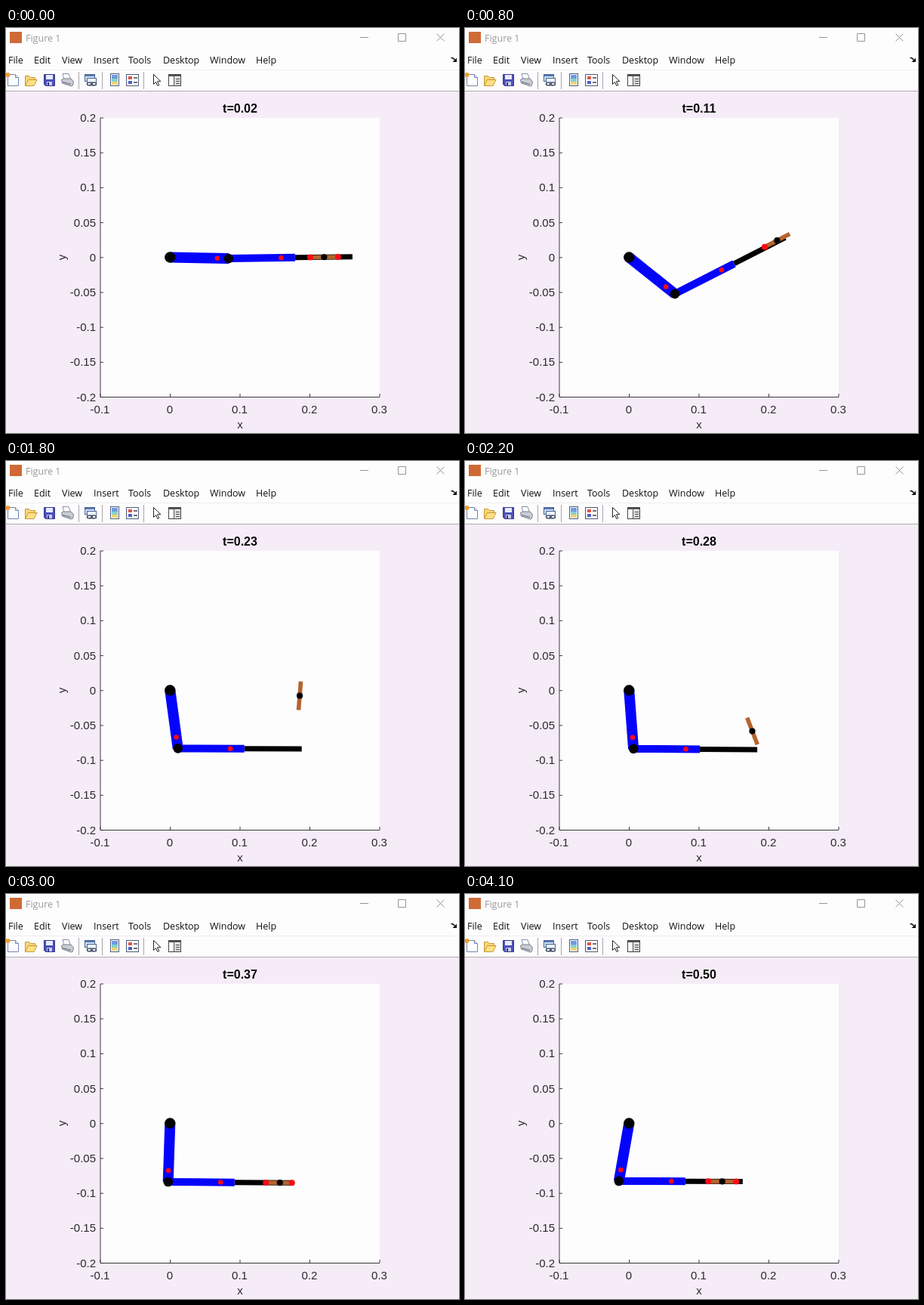
An HTML page that plays this animation: 600x536 px, repeating every 4.2 s.

```html
<!DOCTYPE html>
<html lang="en">
<head>
<meta charset="utf-8">
<title>Figure 1</title>
<style>
html, body { margin: 0; width: 100%; height: 100%; overflow: hidden; background: #f5ecf8; }
svg { display: block; width: 600px; height: 536px; }
.ui { font: 12.5px "Open Sans", sans-serif; fill: #111; }
.ax { font: 15px "Liberation Sans", sans-serif; fill: #2b2a2c; }
.head { font: bold 16px "Liberation Sans", sans-serif; fill: #0a0a0a; }
</style>
</head>
<body>
<svg viewBox="0 0 600 536" xmlns="http://www.w3.org/2000/svg">
  <rect width="600" height="536" fill="#f5ecf8"/>
  <rect width="600" height="83" fill="#fefdfe"/>
  <path d="M0 55.5H600" stroke="#f0ecf1"/>
  <path d="M0 83.5H600" stroke="#b0acb1"/>

  <!-- title bar -->
  <rect x="5" y="5" width="16" height="15" fill="#cf6a35"/>
  <text class="ui" x="26" y="17.5" style="fill:#999">Figure 1</text>
  <path d="M469 12.5H480M519.5 7.5h10v10h-10zM570.5 7.5l10 10m0-10l-10 10" fill="none" stroke="#959595"/>
  <path d="M589.5 39.5q3-.5 5 3" fill="none" stroke="#111" stroke-width="1.5"/>
  <path d="M597 39.5V45H591.5z" fill="#111"/>
  <g id="menu" class="ui"></g>

  <!-- toolbar -->
  <g stroke-width="1">
    <path d="M2.5 61.5h10l4 4v11h-14z" fill="#fdfdff" stroke="#7186ad"/>
    <path d="M12.5 61.5v4h4" fill="#d7e0f2" stroke="#7186ad"/>
    <circle cx="2.5" cy="62" r="3" fill="#ef9d32"/>
    <path d="M25.5 76V63.5h5l2 2h6v3" fill="#f7d675" stroke="#c49a3a"/>
    <path d="M25.5 76.5l4-8h11.5l-4 8z" fill="#ffe083" stroke="#c49a3a"/>
    <path d="M50.5 61.5h14v15h-12l-2-2z" fill="#4c50ba" stroke="#34388c"/>
    <rect x="53" y="62" width="9" height="6" fill="#e8ecfb"/>
    <rect x="54" y="71" width="7" height="5" fill="#c9cfe6"/>
    <rect x="55" y="72" width="2" height="4" fill="#34388c"/>
    <path d="M77 68l-2-7.5h8l2.5 7.5z" fill="#fff" stroke="#8891a5"/>
    <path d="M73.5 68.5l2.500-1.500h10l3.500 4-1 5-2 1-12-4z" fill="#c9ccd5" stroke="#787e8c"/>
    <path d="M75 71.5l11 3" stroke="#5f6572"/>
    <rect x="104.5" y="61.5" width="13" height="9" fill="#cfe0f5" stroke="#47648f"/>
    <path d="M105 63h12" stroke="#5679b5" stroke-width="2"/>
    <rect x="107.5" y="66.5" width="12" height="9" fill="#eef4fc" stroke="#47648f"/>
    <ellipse cx="111" cy="74" rx="3.5" ry="2" fill="none" stroke="#4b5568" stroke-width="1.5"/>
    <ellipse cx="116" cy="74" rx="3.5" ry="2" fill="none" stroke="#4b5568" stroke-width="1.5"/>
    <rect x="138.5" y="60.5" width="11" height="16" fill="#fff" stroke="#4d5c78"/>
    <rect x="140" y="62" width="8" height="5" fill="#6f9be0"/>
    <rect x="140" y="67" width="8" height="4" fill="#86d2cc"/>
    <rect x="140" y="71" width="8" height="4" fill="#f1d477"/>
    <rect x="159.5" y="61.5" width="16" height="15" fill="#fff" stroke="#4d5c78"/>
    <rect x="162" y="64" width="5" height="4" fill="#dd5548"/>
    <rect x="162" y="70" width="5" height="4" fill="#4d62c9"/>
    <path d="M169 66h5M169 72h5" stroke="#444" stroke-width="1.5"/>
    <path d="M195.5 61.5v13l3-3 2.300 5 2-1-2.300-4.800h4.500z" fill="#fff" stroke="#222"/>
    <rect x="215.5" y="61.5" width="16" height="15" fill="#fff" stroke="#444"/>
    <path d="M216 63h15" stroke="#555" stroke-width="2"/>
    <rect x="223" y="65" width="8" height="11" fill="#dcd9de"/>
    <path d="M222.5 64v12M225 67.5h5M225 70.5h5M225 73.5h5" stroke="#555"/>
    <path d="M96.5 58v23M127.5 58v23M182.5 58v23" stroke="#a9a5ab"/>
  </g>

  <!-- axes -->
  <rect x="125" y="119" width="370" height="370" fill="#fefdfe"/>
  <g id="axes" class="ax"></g>
  <text id="head" class="head" x="310" y="112" text-anchor="middle"></text>

  <g id="arm"></g>
</svg>
<script>
const $ = id => document.getElementById(id);

function add(parent, tag, attrs, text) {
  const el = document.createElementNS("http://www.w3.org/2000/svg", tag);
  set(el, attrs);
  if (text !== undefined) el.textContent = text;
  return parent.appendChild(el);
}
function set(el, attrs) {
  for (const k in attrs) el.setAttribute(k, attrs[k]);
}

const menu = { File: 3, Edit: 37, View: 74, Insert: 116, Tools: 162, Desktop: 208, Window: 270, Help: 331 };
for (const name in menu) add($("menu"), "text", { x: menu[name], y: 47 }, name);

let ticks = "M125 119V488.5H495";
for (let i = 0; i < 5; i++) {
  const x = 125 + 92.5 * i;
  ticks += `M${x} 488v-4`;
  add($("axes"), "text", { x: x - 0.5, y: 509.5, "text-anchor": "middle" }, +((i - 1) / 10).toFixed(1));
}
for (let i = 0; i < 9; i++) {
  const y = 119 + 46.2 * i;
  ticks += `M125 ${y}h4`;
  add($("axes"), "text", { x: 119, y: y + 5, "text-anchor": "end" }, +(0.2 - 0.05 * i).toFixed(2));
}
add($("axes"), "path", { d: ticks, fill: "none", stroke: "#3a383b" });
add($("axes"), "text", { x: 310, y: 529.5, "text-anchor": "middle" }, "x");
add($("axes"), "text", { transform: "translate(78.5 303.5) rotate(-90)", "text-anchor": "middle" }, "y");

const bar = (stroke, width) => add($("arm"), "line", { stroke, "stroke-width": width });
const dot = (fill, r) => add($("arm"), "circle", { fill, r });
const BLUE = "#0404fb", RED = "#fb0a14", BLACK = "#030203";
const upper = bar(BLUE, 14), paddle = bar(BLACK, 7), fore = bar(BLUE, 10);
const base = dot(BLACK, 7.2), elbow = dot(BLACK, 6.3);
const upperMass = dot(RED, 3.3), foreMass = dot(RED, 3.3);
const rod = bar("#b4642e", 5.6), rodMass = dot(BLACK, 4.1);
const rear = dot(RED, 4), front = dot(RED, 4);

// Piecewise linear curve through [step, value] points
function curve(points, n) {
  let i = 1;
  while (i < points.length - 1 && points[i][0] < n) i++;
  const [a, u] = points[i - 1], [b, v] = points[i];
  return u + (v - u) * (n - a) / (b - a);
}

const upperKeys = [[11, 66], [12, 75.5], [13, 77], [14, 78.3], [18, 82.3], [22, 85.7], [30, 91.9], [41, 100]];
const foreKeys = [[8, -27], [9, -29.5], [10, -25.5], [11, -18.5], [12, -11.6], [13, -7], [14, -3.7],
  [15, -1.6], [16, -0.5], [18, 0.2], [22, 0.4], [30, 0.4], [41, 0.2]];
const rodX = [[8, 413.3], [12, 403], [18, 389], [22, 380.5], [30, 362.8], [41, 340.7]];
const rodTurn = [[8, -27.5], [9, -30], [10, -34], [12, -45], [18, -85.4], [22, -111], [23, -128], [24, -156], [25, -180]];

const SHOULDER = [217.3, 303.5];
const polar = ([x, y], r, deg) => {
  const a = deg * Math.PI / 180;
  return [x + r * Math.cos(a), y + r * Math.sin(a)];
};
const line = (el, [x1, y1], [x2, y2]) => set(el, { x1, y1, x2, y2 });
const put = (el, [cx, cy], on = true) => set(el, { cx, cy, visibility: on ? "visible" : "hidden" });

function rodPose(n, joint, tilt) {
  if (n < 8) return [polar(joint, 126.5 + 25.5 * (n / 8) ** 3.2, tilt), tilt];
  const x = curve(rodX, n);
  const floor = joint[1] + (x - joint[0]) * Math.tan(tilt * Math.PI / 180);
  if (n >= 25) return [[x, floor], tilt];
  const turn = curve(rodTurn, n), k = n - 12;
  // after touchdown the rod tips over its lower end
  const y = n > 22 ? floor + 18.5 * Math.sin(turn * Math.PI / 180) : 278 + 1.7 * k + 0.625 * k * k;
  return [[x, y], turn];
}

function draw(n) {
  const swing = (n + 1.7) ** 2;
  const lift = n <= 11 ? 0.41 * swing : curve(upperKeys, n);
  const tilt = n <= 8 ? -0.287 * swing : curve(foreKeys, n);
  const joint = polar(SHOULDER, 77.6, lift);
  const sleeve = polar(joint, 88, tilt);
  const tip = polar(joint, 164, tilt);

  line(upper, SHOULDER, joint);
  line(fore, joint, sleeve);
  line(paddle, sleeve, tip);
  put(base, SHOULDER);
  put(elbow, joint);
  put(upperMass, polar(SHOULDER, 62.6, lift));
  put(foreMass, polar(joint, 69.5, tilt));

  const [mid, turn] = rodPose(n, joint, tilt);
  line(rod, polar(mid, -19, turn), polar(mid, 19, turn));
  put(rodMass, mid);

  // contact points: the rod ends, but never past the paddle tip
  const flat = n <= 6 || n >= 25;
  const reach = flat ? Math.min(18.5, Math.hypot(tip[0] - mid[0], tip[1] - mid[1])) : 18.5;
  put(rear, polar(mid, -18.5, turn), n <= 8 || n > 22);
  put(front, polar(mid, reach, turn), flat);

  $("head").textContent = "t=" + (0.02 + 0.0117 * n).toFixed(2);
}

const start = performance.now();
function tick() {
  const ms = Math.max(0, performance.now() - start) % 4200;
  draw(Math.floor(ms / 100));
  requestAnimationFrame(tick);
}
tick();
</script>
</body>
</html>
```
